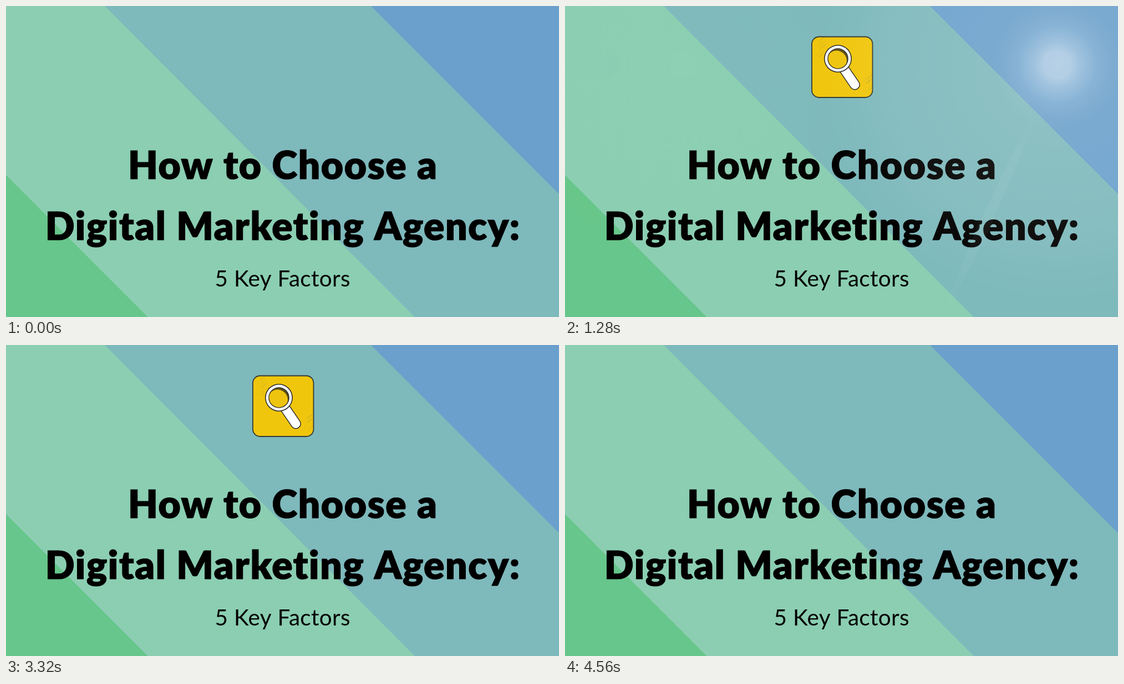
Animation, 997 px wide and 561 px high, one loop 4.68 s. Source, as an HTML page with a canvas:

```html
<!DOCTYPE html>
<html lang="en">
<head>
<meta charset="utf-8">
<title>How to Choose a Digital Marketing Agency</title>
<style>
html, body { margin: 0; width: 100%; height: 100%; overflow: hidden; background: #8bceb2; }
canvas { display: block; width: 997px; height: 561px; }
</style>
</head>
<body>
<canvas id="stage" width="997" height="561"></canvas>
<script>
const W = 997, H = 561, LOOP = 4680, STEP = 40;
const FLARE_Y = 106, MID = 498;
const ctx = document.getElementById('stage').getContext('2d');

const SWEEPS = [
  { start: 120, span: 1440, from: -170, to: 1143 },
  { start: 3320, span: 1240, from: -170, to: 1184 }
];
const HOPS = [
  { start: 1690, span: 553, height: 59 },
  { start: 2243, span: 407, height: 42 }
];

const clamp = v => Math.max(0, Math.min(1, v));

function polygon(color, ...pts) {
  ctx.fillStyle = color;
  ctx.beginPath();
  pts.forEach(([x, y]) => ctx.lineTo(x, y));
  ctx.fill();
}

function disc(x, y, r, fill) {
  ctx.fillStyle = fill;
  ctx.beginPath();
  ctx.arc(x, y, r, 0, Math.PI * 2);
  ctx.fill();
}

// stops: [offset, alpha] pairs
function glow(x, y, r, rgb, stops) {
  const g = ctx.createRadialGradient(x, y, 0, x, y, r);
  stops.forEach(([at, a]) => g.addColorStop(at, `rgba(${rgb},${a})`));
  disc(x, y, r, g);
}

function label(text, y, weight, size, tracking) {
  ctx.font = `${weight} ${size}px Lato, "Open Sans", sans-serif`;
  ctx.letterSpacing = tracking + 'px';
  ctx.textAlign = 'center';
  ctx.fillStyle = '#000';
  ctx.fillText(text, 498.5 + tracking / 2, y);
}

function title(text, y) {
  label(text, y, 900, 69.5, 1.6);
  ctx.strokeStyle = '#000';
  ctx.lineWidth = 1.2;
  ctx.lineJoin = 'miter';
  ctx.miterLimit = 3;
  ctx.strokeText(text, 499.3, y);
}

function backdrop() {
  ctx.fillStyle = '#8bceb2';
  ctx.fillRect(0, 0, W, H);
  polygon('#67c68b', [0, 305], [255.5, H], [0, H]);
  polygon('#7eb9bc', [178, 0], [W, 0], [W, H], [737, H]);
  polygon('#6aa0cb', [658, 0], [W, 0], [W, 339]);
}

function scratches() {
  let seed = 7;
  const rnd = () => (seed = seed * 16807 % 2147483647) / 2147483647;
  ctx.strokeStyle = 'rgba(170,160,60,.35)';
  ctx.lineWidth = 0.8;
  for (let i = 0; i < 26; i++) {
    const right = i % 2, x = (right ? 92 : 4) + rnd() * 12, y = (right ? 66 : 6) + rnd() * 34;
    ctx.beginPath();
    ctx.moveTo(x, y);
    ctx.lineTo(x + 6 + rnd() * 6, y - 5 - rnd() * 5);
    ctx.stroke();
  }
}

function icon(lift, alpha) {
  if (alpha <= 0) return;
  ctx.save();
  ctx.globalAlpha = alpha;
  ctx.translate(445, 55.5 - lift);
  ctx.beginPath();
  ctx.roundRect(0, 0, 109.5, 109.5, 13);
  ctx.fillStyle = '#f0c60d';
  ctx.fill();
  ctx.save();
  ctx.clip();
  scratches();
  ctx.restore();
  ctx.beginPath();
  ctx.roundRect(0, 0, 109.5, 109.5, 13);
  ctx.strokeStyle = '#343a35';
  ctx.lineWidth = 1.8;
  ctx.stroke();

  // handle
  ctx.lineCap = 'round';
  [['#2b2d2b', 19], ['#fff', 16]].forEach(([color, width]) => {
    ctx.strokeStyle = color;
    ctx.lineWidth = width;
    ctx.beginPath();
    ctx.moveTo(58, 58);
    ctx.lineTo(77.5, 86.5);
    ctx.stroke();
  });

  // lens
  disc(47, 39.5, 25, '#2b2d2b');
  disc(47, 39.5, 23.4, '#fff');
  disc(47, 39.5, 18.8, '#2b2d2b');
  ctx.save();
  ctx.beginPath();
  ctx.arc(47, 39.5, 17.4, 0, Math.PI * 2);
  ctx.clip();
  disc(47, 39.5, 18, '#5b4d16');
  disc(44.5, 43.5, 18.5, '#eec40e');
  ctx.restore();
  ctx.restore();
}

function beam(x, angle) {
  const g = ctx.createLinearGradient(0, 90, 0, 470);
  g.addColorStop(0, 'rgba(255,255,255,0)');
  g.addColorStop(0.3, 'rgba(255,255,255,.09)');
  g.addColorStop(0.75, 'rgba(255,255,255,.09)');
  g.addColorStop(1, 'rgba(255,255,255,.03)');
  ctx.save();
  ctx.translate(x, FLARE_Y);
  ctx.rotate(angle);
  polygon(g, [-4, 90], [4, 90], [11, 320], [5, 470], [-5, 470], [-11, 320]);
  ctx.restore();
}

// reflections strung along the line through the stage centre
function ghosts(off) {
  const at = ratio => MID + off * ratio;
  const side = off < 0 ? 1 : -1;

  ctx.globalCompositeOperation = 'screen';
  glow(at(-0.75), FLARE_Y + 40, 330, '230,190,70', [[0, 0.2], [0.65, 0.16], [1, 0]]);

  ctx.globalCompositeOperation = 'source-over';
  const ring = at(-2.05);
  ctx.strokeStyle = 'rgba(115,212,178,.24)';
  ctx.lineWidth = 28;
  ctx.beginPath();
  ctx.arc(ring, FLARE_Y, 93, 0, Math.PI * 2);
  ctx.stroke();
  disc(ring, FLARE_Y, 79, 'rgba(115,212,178,.1)');

  disc(at(-0.73), FLARE_Y, 25, 'rgba(145,220,198,.42)');
  const lens = at(-1.08);
  disc(lens - side * 4, FLARE_Y, 19, 'rgba(95,185,205,.5)');
  disc(lens + side * 8, FLARE_Y, 19, 'rgba(115,195,205,.4)');
  const dot = at(2.58) + 10;
  glow(dot, FLARE_Y, 22, '110,215,150', [[0, 0.8], [0.6, 0.4], [1, 0]]);
  glow(dot, FLARE_Y, 11, '205,225,90', [[0, 1], [0.65, 0.95], [1, 0]]);
}

function flare(x, p) {
  const e = Math.pow(Math.sin(Math.PI * p), 1.5);
  if (!(e > 0.001)) return;
  const off = x - MID;
  ctx.save();
  ctx.globalCompositeOperation = 'screen';
  ctx.globalAlpha = e;
  glow(x, FLARE_Y, 330 + 360 * Math.pow(e, 1.5), '255,246,236',
    [[0, 0.28], [0.3, 0.25], [0.5, 0.21], [0.72, 0.15], [0.88, 0.06], [1, 0]]);
  beam(x, (off + 194) * 0.00073);
  ctx.globalAlpha = e ** 3;
  ghosts(off);
  ctx.globalCompositeOperation = 'screen';
  ctx.globalAlpha = 0.75 * Math.pow(e, 0.6);
  glow(x, FLARE_Y, 320 * Math.pow(e, 1.2), '250,252,255',
    [[0, 1], [0.2, 0.95], [0.35, 0.62], [0.6, 0.23], [0.8, 0.08], [1, 0]]);
  ctx.restore();
}

function hopLift(t) {
  const hop = HOPS.find(h => t >= h.start && t < h.start + h.span);
  if (!hop) return 0;
  const u = (t - hop.start) / hop.span;
  return hop.height * 4 * u * (1 - u);
}

function draw(t) {
  const [enter, leave] = SWEEPS.map(s => {
    const p = clamp((t - s.start) / s.span);
    return { p, x: s.from + (s.to - s.from) * p };
  });
  const passed = s => clamp((s.x - 440) / 120);

  backdrop();
  title('How to Choose a', 312);
  title('Digital Marketing Agency:', 422);
  icon(hopLift(t), passed(enter) * (1 - passed(leave)));
  flare(enter.x, enter.p);
  flare(leave.x, leave.p);
  label('5 Key Factors', 506, 400, 40.5, 0.3);
}

const begin = performance.now();
function tick() {
  const t = (performance.now() - begin) % LOOP;
  draw(Math.floor(t / STEP) * STEP);
  requestAnimationFrame(tick);
}
tick();
</script>
</body>
</html>
```
